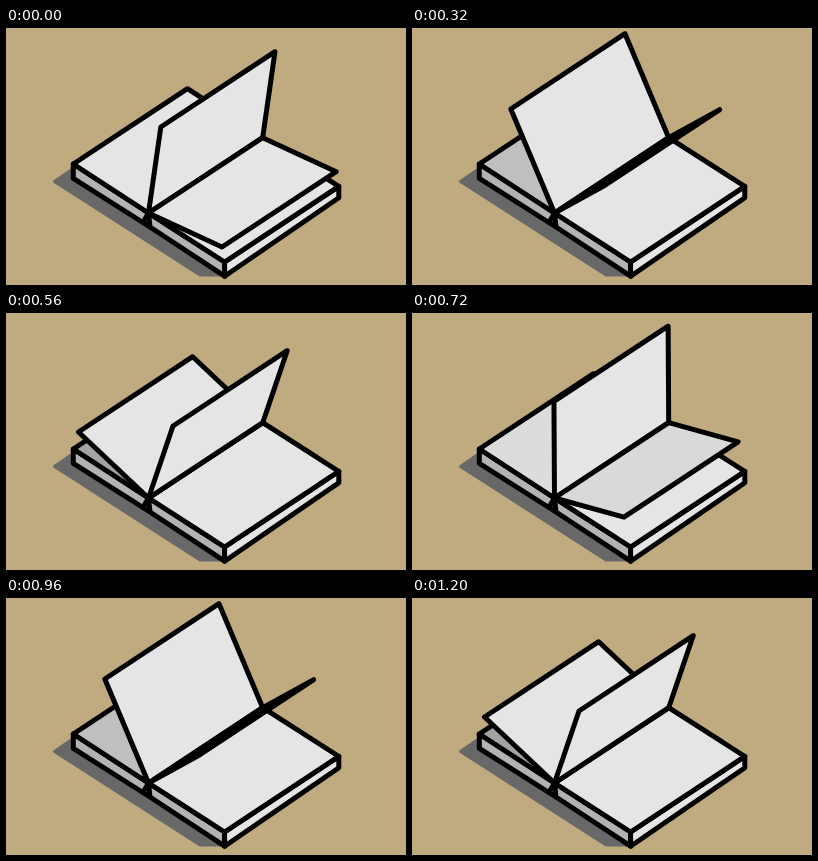
Recreate the animation shown at these times as an HTML page. Size 400 by 257 pixels, loop 1280 ms.

```html
<!DOCTYPE html>
<html lang="en">
<head>
<meta charset="utf-8">
<title>Turning pages</title>
<style>
html, body { margin: 0; width: 100%; height: 100%; overflow: hidden; background: #c0ab80; }
svg { display: block; width: 100%; height: 100%; }
.shadow { fill: #686868; stroke: #686868; stroke-width: 3; stroke-linejoin: round; }
.ink { stroke: #000; stroke-width: 5; stroke-linejoin: round; stroke-linecap: round; }
.side { fill: #b3b3b3; }
.paper { fill: #e5e5e5; }
</style>
</head>
<body>
<svg viewBox="0 0 400 257">
  <polygon class="shadow" points="48.5,153.5 68,140 219,247 194,247"/>
  <g class="ink">
    <polygon class="side" points="67.3,136 142.5,185 144,199 67.3,150.3"/>
    <polygon class="side" points="142.5,185 218.6,234 218.6,248.2 144,199"/>
    <path d="M142.5 185L137 194.5"/>
    <polygon class="paper" points="218.6,234 332.8,158.4 332.8,169.8 218.6,248.2"/>
    <polygon id="left" points="67.3,136 181.5,60.7 256.7,109.7 142.5,185"/>
    <polygon class="paper" points="142.5,185 256.7,109.7 332.8,158.4 218.6,234"/>
    <polygon id="older"/>
    <polygon id="newer"/>
  </g>
</svg>
<script>
const STEP = 80, CYCLE = 8, LIGHT = 229;
const near = [142.5, 185], far = [256.7, 109.7];

// Free edge relative to the spine: [step, x, y]
const path = [
  [-1, 76, 49], [0, 73.5, 34], [2, 64.5, 4], [4, 51, -28], [7, 24.5, -72],
  [8, 12.3, -86], [10, -14, -104], [12, -43.7, -104], [15, -70, -66], [16, -75, -49]
];
const el = id => document.getElementById(id);
const grey = v => `rgb(${v},${v},${v})`;

function slope(i, axis) {
  const a = path[Math.max(i - 1, 0)], b = path[Math.min(i + 1, path.length - 1)];
  return (b[axis] - a[axis]) / (b[0] - a[0]);
}

// Smooth curve through the path points
function edgeAt(t) {
  let i = 0;
  while (i < path.length - 2 && path[i + 1][0] <= t) i++;
  const a = path[i], b = path[i + 1], h = b[0] - a[0], u = (t - a[0]) / h;
  const w = u * u * (3 - 2 * u);
  return [1, 2].map(k =>
    a[k] * (1 - w) + b[k] * w +
    h * u * (1 - u) * ((1 - u) * slope(i, k) - u * slope(i + 1, k)));
}

function drawPage(node, t) {
  const [x, y] = edgeAt(t);
  const topSide = y > -x * 2 / 3;
  node.setAttribute('points', [
    near, far, [far[0] + x, far[1] + y], [near[0] + x, near[1] + y]
  ].join(' '));
  node.setAttribute('fill', grey(topSide ? LIGHT - 12 * t : LIGHT));
}

const left = el('left'), older = el('older'), newer = el('newer');
const start = performance.now();

function draw(now) {
  const k = Math.floor(Math.max(0, now - start) / STEP) % CYCLE;
  left.setAttribute('fill', grey(Math.round(LIGHT - 9.4 * k)));
  drawPage(older, k + CYCLE);
  drawPage(newer, k);
  requestAnimationFrame(draw);
}
draw(start);
</script>
</body>
</html>
```
